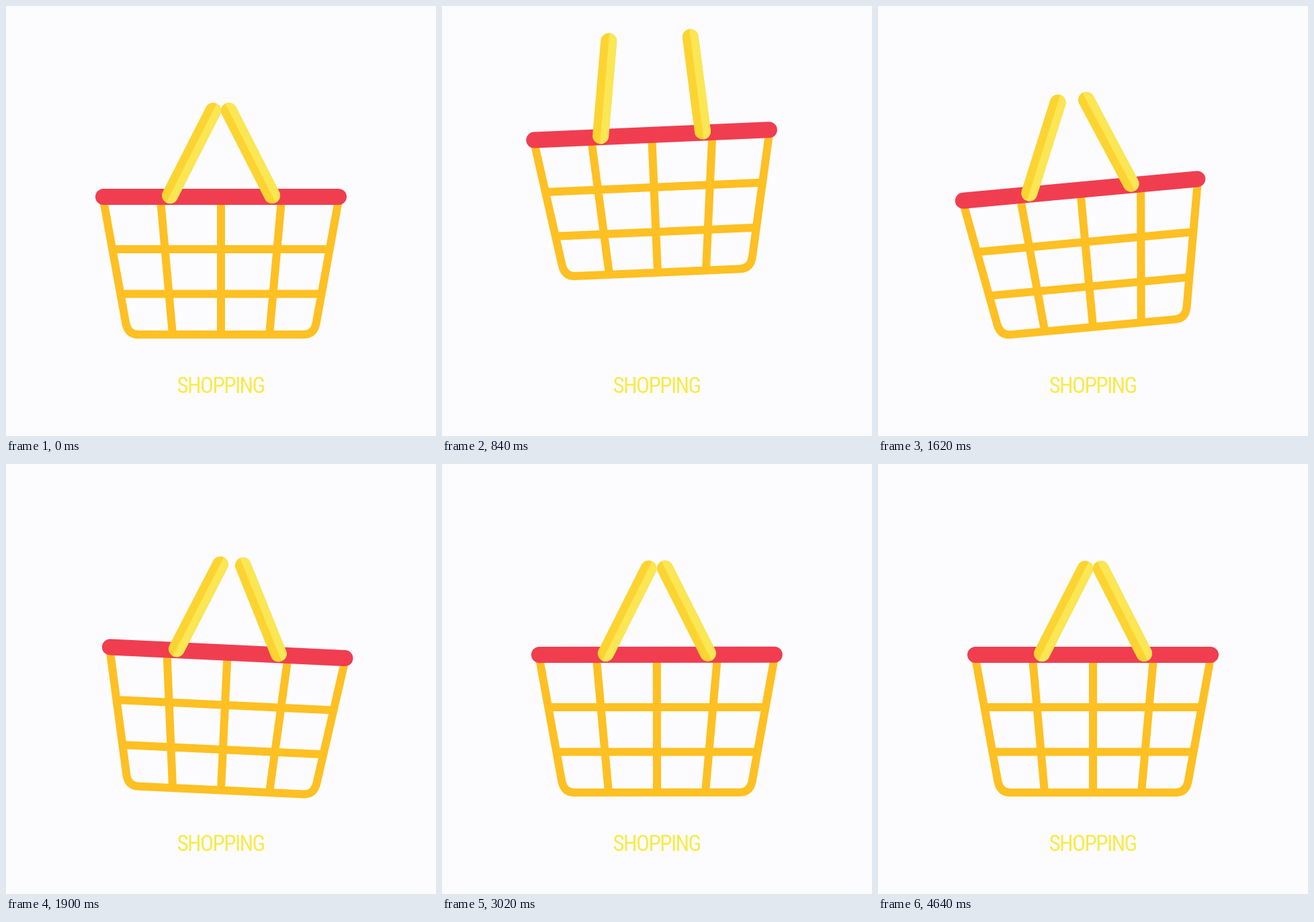
An HTML page with a canvas that plays this animation: 640 by 640 pixels, repeating every 4.71 s.

```html
<!DOCTYPE html>
<html lang="en">
<head>
<meta charset="utf-8">
<title>Shopping basket</title>
<style>
  html, body { margin: 0; width: 100%; height: 100%; overflow: hidden; background: #fcfcff; }
  canvas { display: block; width: 100vmin; height: 100vmin; }
</style>
</head>
<body>
<canvas id="stage" width="640" height="640"></canvas>
<script>
const ctx = document.getElementById('stage').getContext('2d');
const LOOP = 4710, STEP = LOOP / 67;
const TAKEOFF = 365, JUMP = 800, BOUNCE = 550;
const RAD = Math.PI / 180;
const COLOR = {
  back: '#fcfcff', wire: '#fec022', rim: '#f03e50',
  shade: '#fcd432', shine: '#fbe653', text: '#f8ea4c'
};

const arch = u => 4 * u * (1 - u);
const easeInOut = u => (1 - Math.cos(Math.PI * u)) / 2;

// A high jump, then equally long bounces, each a fifth as high.
function lift(t) {
  if (t < JUMP) return 96 * arch(t / JUMP);
  const bounces = (t - JUMP) / BOUNCE, n = Math.floor(bounces);
  return 96 * 0.2 ** (n + 1) * arch(bounces - n);
}

// Swings from side to side; the swing holds its size, then dies away.
function tilt(t) {
  const first = 270, swing = 330, size = 6.2;
  if (t < first) return size * easeInOut(t / first);
  const n = (t - first) / swing;
  return size / (1 + (n / 3.85) ** 7) * Math.cos(Math.PI * n);
}

// Short sideways push at take-off.
function kick(t) {
  const u = t / JUMP;
  return 78 * u * Math.exp(-6.4 * u);
}

// Handles swing open on the way up and settle back together.
function lean(t) {
  const opening = 475;
  const open = t < opening
    ? Math.sin(t / opening * Math.PI / 2)
    : Math.exp((opening - t) / 485);
  return 27 - 21 * open;
}

function line(x0, y0, x1, y1) {
  ctx.moveTo(x0, y0);
  ctx.lineTo(x1, y1);
}

function stroke(color, width, cap) {
  ctx.strokeStyle = color;
  ctx.lineWidth = width;
  ctx.lineCap = cap;
  ctx.stroke();
}

// Local origin: centre of the basket's bottom bar.
function drawWires() {
  ctx.beginPath();
  ctx.moveTo(0, 0);
  for (const side of [-1, 1]) {
    ctx.moveTo(0, 0);
    ctx.lineTo(side * 123, 0);
    ctx.quadraticCurveTo(side * 138, 0, side * 141.5, -16);
    ctx.lineTo(side * 175, -200);
    line(side * 90, -200, side * 72, 0);
  }
  line(0, -200, 0, 0);
  line(-162, -127, 162, -127);
  line(-150, -60.5, 150, -60.5);
  stroke(COLOR.wire, 12, 'butt');
}

function drawRim() {
  ctx.beginPath();
  line(-175, -205, 175, -205);
  stroke(COLOR.rim, 24, 'round');
}

function drawHandle(x, degrees) {
  const length = 141.5, r = 12;
  ctx.save();
  ctx.translate(x, -207);
  ctx.rotate(degrees * RAD);
  ctx.beginPath();
  line(0, 0, 0, -length);
  stroke(COLOR.shade, 2 * r, 'round');
  ctx.fillStyle = COLOR.shine;
  ctx.beginPath();
  ctx.arc(0, -length, r, -Math.PI / 2, 0);
  ctx.arc(0, 0, r, 0, Math.PI / 2);
  ctx.fill();
  ctx.restore();
}

// Uses the narrowest installed face, sized to the caption's width.
function drawCaption() {
  const text = 'SHOPPING';
  const setFont = (family, size) => {
    ctx.font = `extra-condensed ${size}px "${family}", sans-serif`;
    ctx.letterSpacing = `${-0.05 * size}px`;
  };
  const widthOf = family => {
    setFont(family, 100);
    return ctx.measureText(text).width;
  };
  const family = ['Roboto Condensed', 'Roboto', 'Open Sans', 'Noto Sans']
    .reduce((best, next) => widthOf(next) < widthOf(best) ? next : best);
  const size = 100 * 130 / widthOf(family);
  setFont(family, size);
  ctx.fillStyle = COLOR.text;
  ctx.textAlign = 'center';
  ctx.fillText(text, 319.5, 564.5 + size * 0.355);
}

function draw(time) {
  const t = Math.max(0, time - TAKEOFF);
  ctx.fillStyle = COLOR.back;
  ctx.fillRect(0, 0, 640, 640);
  drawCaption();
  ctx.save();
  ctx.translate(320 + kick(t), 489 - lift(t));
  ctx.rotate(tilt(t) * RAD);
  drawWires();
  drawRim();
  const sway = 1.25 * kick(t);
  drawHandle(-76, sway + lean(t));
  drawHandle(76, sway - lean(t));
  ctx.restore();
}

function tick() {
  const t = performance.now() % LOOP;
  draw(Math.floor((t + 5) / STEP) * STEP % LOOP);
  requestAnimationFrame(tick);
}
tick();
</script>
</body>
</html>
```
